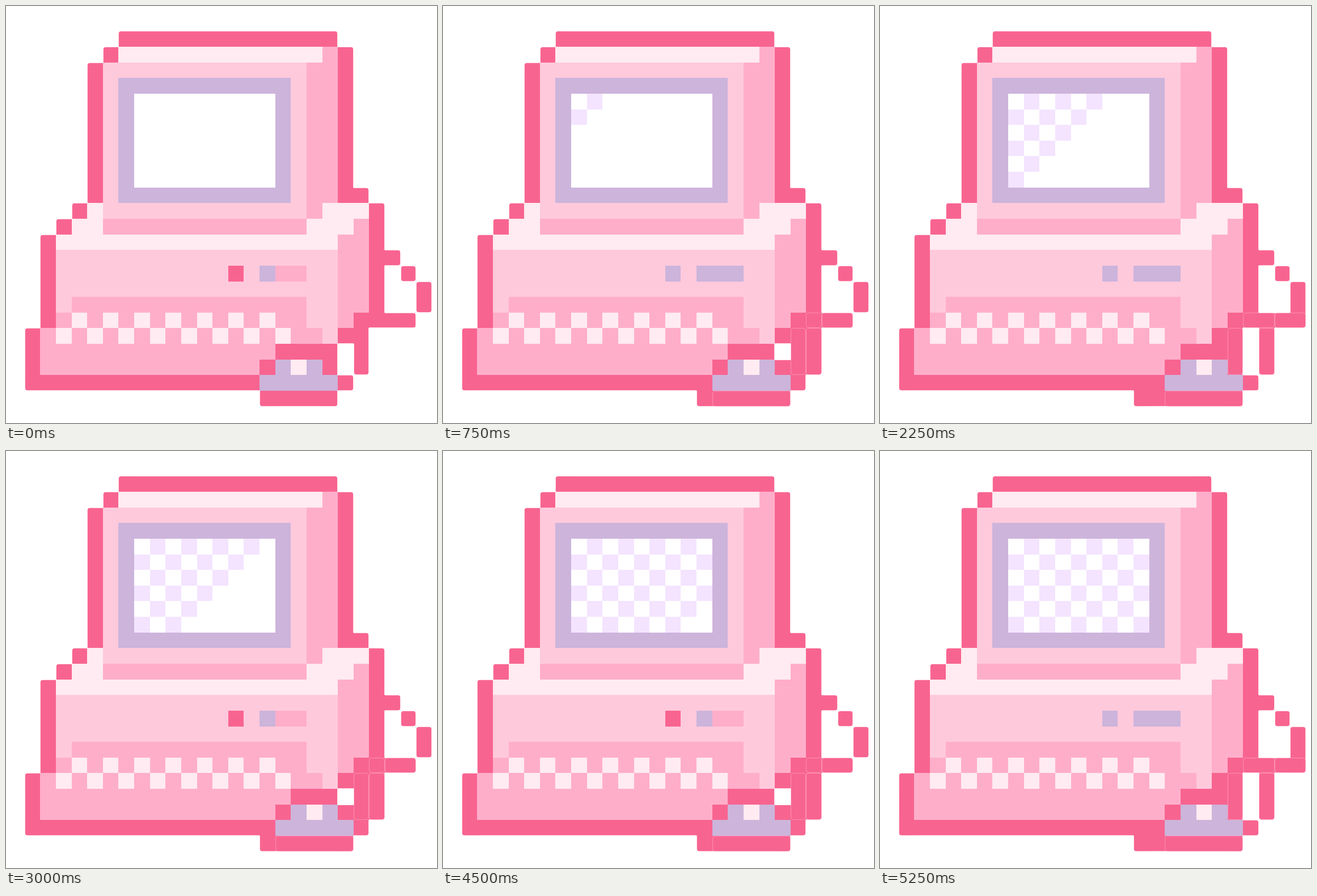
An HTML page with a canvas for the animation above (6000 ms loop, 760 px wide and 737 px high).

```html
<!DOCTYPE html>
<html lang="en">
<head>
<meta charset="utf-8">
<title>Pink computer</title>
<style>
  html, body { margin: 0; height: 100%; overflow: hidden; background: #fff; }
  canvas { display: block; }
</style>
</head>
<body>
<canvas id="stage" width="760" height="737"></canvas>
<script>
const ctx = document.getElementById('stage').getContext('2d');
const DARK = '#f86490', PINK = '#ffaeca', MID = '#ffc9dc', LIGHT = '#ffebf1';
const LAVENDER = '#ccb4db', CHECK = '#f4e4ff', WHITE = '#ffffff';
const COLS = 28, ROWS = 26, CELL = 27.63, STEP_MS = 750, STEPS = 8;
const RADIUS = 4, INSET = 0.8;
const px = col => Math.round(5 + CELL * col);
const py = row => Math.round(16.8 + CELL * row);

let grid, seams;
const cell = (c, r) => grid[r * COLS + c];

function fill(color, col, row, w = 1, h = 1) {
  for (let r = row; r < row + h; r++)
    for (let c = col; c < col + w; c++) grid[r * COLS + c] = color;
}

// A dark part that keeps a faint edge of its own.
function piece(...box) {
  fill(DARK, ...box);
  seams.push(box);
}

function paintCase(busy) {
  for (let i = 0; i < 3; i++) fill(LIGHT, 5 - i, 12 + i, 18);
  for (let i = 0; i < 2; i++) fill(PINK, 22 - i, 13 + i, 1, 6);
  fill(MID, 3, 15, 18, 6);
  fill(busy ? LAVENDER : DARK, 14, 16);
  fill(busy ? LAVENDER : PINK, 16, 16, 3);
  fill(LAVENDER, 16, 16);
}

function paintKeyboard() {
  for (let i = 0; i < 3; i++) fill(PINK, 4 - i, 18 + i, 15 + i);
  fill(PINK, 18, 20, 2);
  fill(PINK, 2, 21, 17, 2);
  for (let c = 3; c < 18; c++) fill(LIGHT, c, 19 + c % 2);
}

function paintMonitor(step) {
  fill(PINK, 6, 3, 14, 10);
  fill(PINK, 20, 2, 1, 10);
  fill(PINK, 6, 13, 13);
  fill(LIGHT, 7, 2, 13);
  fill(MID, 6, 3, 13, 10);
  fill(LAVENDER, 7, 4, 11, 8);
  fill(WHITE, 8, 5, 9, 6);
  for (let r = 0; r < 6; r++)
    for (let c = 0; c < 9; c++)
      if ((r + c) % 2 && r + c < 2 * step) fill(CHECK, 8 + c, 5 + r);
}

// Every empty cell that touches the body from a side becomes outline.
function paintOutline() {
  const body = grid.slice();
  const has = (c, r) => body[r * COLS + c];
  for (let r = 1; r < ROWS; r++)
    for (let c = 1; c < COLS; c++)
      if (!has(c, r) && (has(c - 1, r) || has(c + 1, r) || has(c, r - 1) || has(c, r + 1)))
        fill(DARK, c, r);
  fill(DARK, 1, 23);
}

function paintMouse(shift) {
  const x = 16 + shift;
  for (let i = 0; i < 3; i++) {
    fill(DARK, 24 + i, 15 + i);
    fill(DARK, 23 + i, 19);
  }
  fill(DARK, 26, 18);
  piece(22, 20, 1, 3);
  piece(22 + shift, 20, 1, 3);
  piece(23, 19, shift);
  piece(23 + shift, 19, 2);

  fill(DARK, x + 1, 21, 3);
  fill(DARK, x, 22, 5);
  fill(LAVENDER, x + 1, 22, 3);
  fill(LIGHT, x + 2, 22);
  fill(LAVENDER, x, 23, 5);
  fill(DARK, x + 5, 23);
  fill(DARK, 16, 24, shift);
  piece(x, 24, 5);
}

function drawCell(c, r) {
  const color = cell(c, r);
  if (!color) return;
  // Dark sides facing the empty page are inset, and their corners rounded.
  const open = (dx, dy) => color === DARK && !cell(c + dx, r + dy);
  const l = open(-1, 0), t = open(0, -1), rt = open(1, 0), b = open(0, 1);
  const left = px(c) + l * INSET, top = py(r) + t * INSET;
  const right = px(c + 1) - rt * INSET, bottom = py(r + 1) - b * INSET;
  const corners = [t && l, t && rt, b && rt, b && l].map(round => round * RADIUS);
  ctx.fillStyle = color;
  ctx.beginPath();
  ctx.roundRect(left, top, right - left, bottom - top, corners);
  ctx.fill();
}

function drawSeam([c, r, w, h = 1]) {
  ctx.beginPath();
  ctx.roundRect(px(c) + .5, py(r) + .5, px(c + w) - px(c) - 1, py(r + h) - py(r) - 1, RADIUS);
  ctx.stroke();
}

function draw(step) {
  const busy = step % 2 === 1;
  const shift = step < 2 ? step : 1 + busy;
  grid = [];
  seams = [];
  paintCase(busy);
  paintKeyboard();
  paintMonitor(step);
  paintOutline();
  paintMouse(shift);

  ctx.fillStyle = WHITE;
  ctx.fillRect(0, 0, 760, 737);
  for (let r = 0; r < ROWS; r++)
    for (let c = 0; c < COLS; c++) drawCell(c, r);
  ctx.strokeStyle = 'rgba(255, 174, 202, .6)';
  if (shift) seams.forEach(drawSeam);
}

let shown = -1;
function tick() {
  const step = Math.floor(performance.now() / STEP_MS) % STEPS;
  if (step !== shown) draw(shown = step);
  requestAnimationFrame(tick);
}
tick();
</script>
</body>
</html>
```
